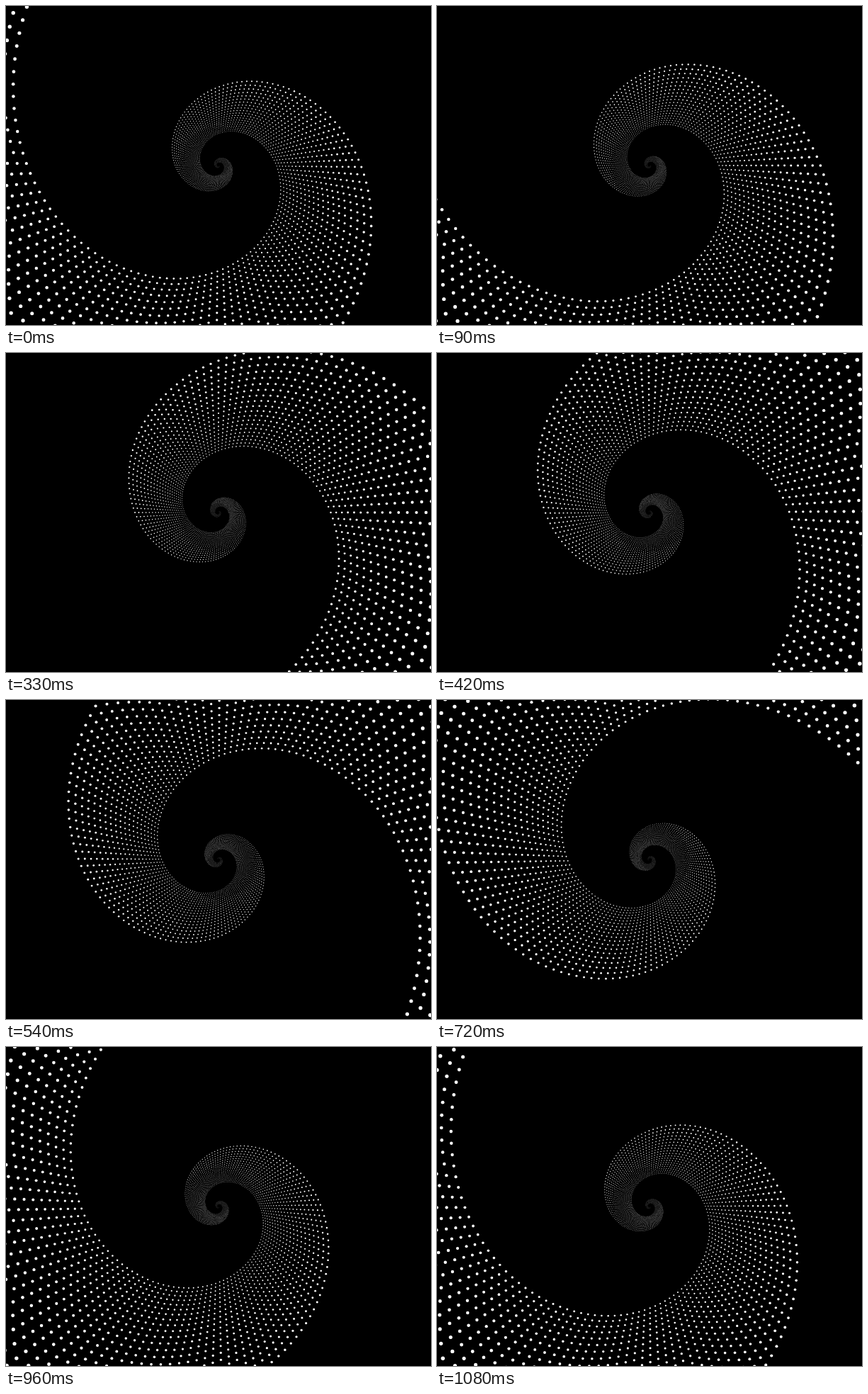
An HTML page with a canvas for the animation above (1.11 s loop, 600 px wide and 450 px high).

```html
<!DOCTYPE html>
<html lang="en">
<head>
<meta charset="utf-8">
<title>Dotted spiral</title>
<style>
html, body { margin: 0; width: 100%; height: 100%; overflow: hidden; background: #000; }
canvas { display: block; }
</style>
</head>
<body>
<canvas id="stage" width="600" height="450"></canvas>
<script>
const ctx = document.getElementById('stage').getContext('2d');
const TAU = Math.PI * 2;
const LOOP = 1110, STEP = 30;
const SPOKES = 120;
const GROWTH = 2.387 / SPOKES; // log radius gained per spoke
const ROWS = 20;
const ROW_GAP = 0.898 / (ROWS - 1); // log radius between rows
const BASE = 201, MAX_R = 385, MIN_R = 1.5;

// [step, turn in spokes]
const KEYS = [[0, 0], [6, 18.4], [11, 33.2], [18, 59.1], [24, 77.5], [29, 92.4], [36, 118.3], [37, 120]];

function turnAt(step) {
  let i = 1;
  while (i < KEYS.length - 1 && step > KEYS[i][0]) i++;
  const [s0, v0] = KEYS[i - 1], [s1, v1] = KEYS[i];
  return v0 + (v1 - v0) * (step - s0) / (s1 - s0);
}

// Each dot keeps its radius; the whole spiral turns.
const dots = [];
for (let n = -250; n < 90; n++) {
  for (let k = 0; k < ROWS; k++) {
    const r = BASE * Math.exp(GROWTH * (n + 0.2) - ROW_GAP * k);
    if (r < MIN_R || r > MAX_R) continue;
    dots.push({ n, r, size: 0.1 * Math.min(1, r / 20) + 0.0072 * r });
  }
}

function draw(step) {
  const turn = turnAt(step) - 0.2;
  ctx.fillStyle = '#000';
  ctx.fillRect(0, 0, 600, 450);
  ctx.fillStyle = '#fff';
  for (const { n, r, size } of dots) {
    const a = (n - turn) * TAU / SPOKES;
    const x = 300 + r * Math.cos(a), y = 225 + r * Math.sin(a);
    if (x < -4 || x > 604 || y < -4 || y > 454) continue;
    ctx.beginPath();
    ctx.arc(x, y, size, 0, TAU);
    ctx.fill();
  }
}

const start = performance.now();
let last = -1;
function tick() {
  const step = Math.floor(((performance.now() - start) % LOOP) / STEP);
  if (step !== last) draw(last = step);
  requestAnimationFrame(tick);
}
tick();
</script>
</body>
</html>
```
